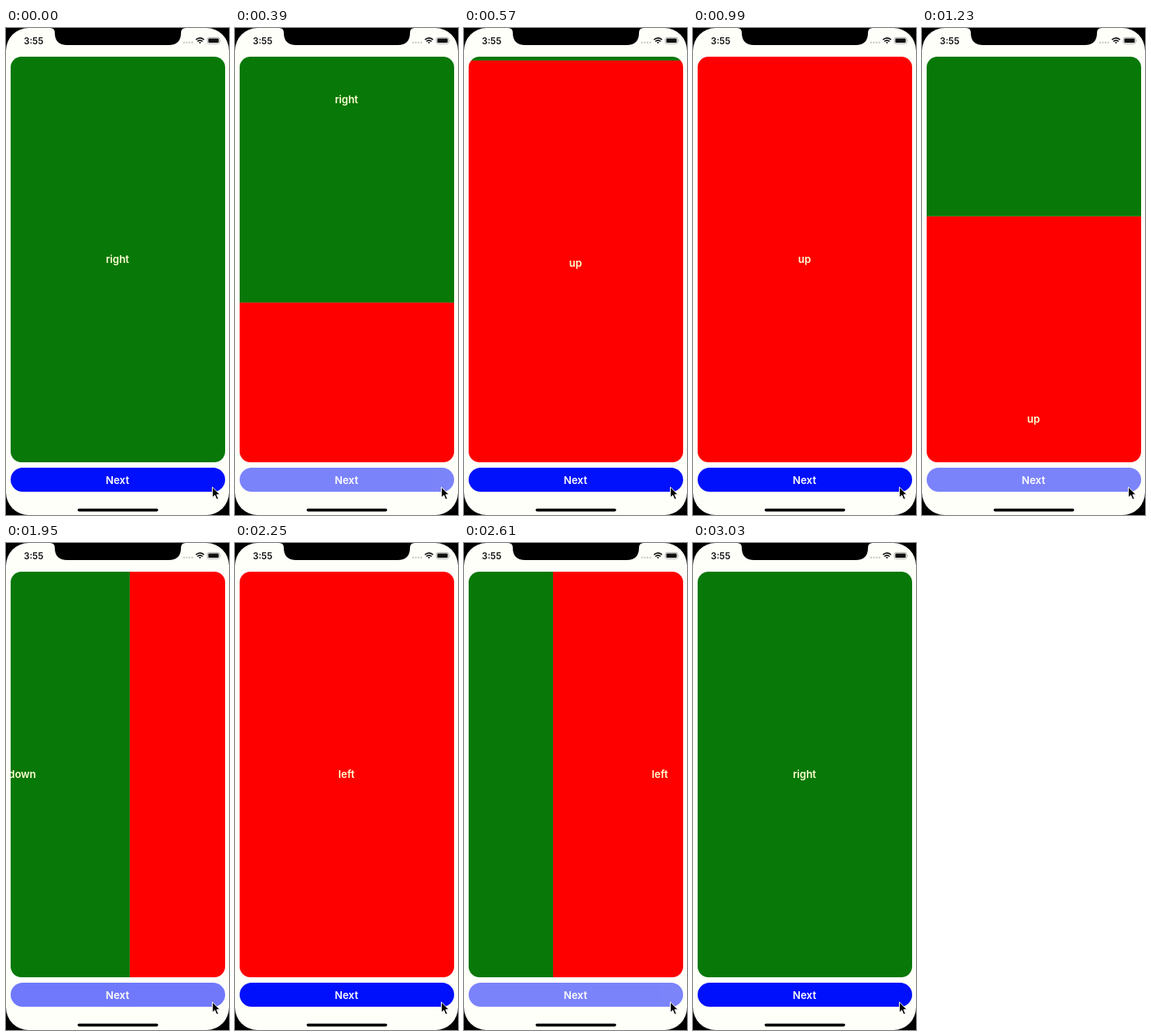
Write an HTML page that moves like this. It is 288 px wide and 628 px high and loops after 3.24 s.

```html
<!DOCTYPE html>
<html lang="en">
<head>
<meta charset="utf-8">
<title>Sliding cards</title>
<style>
  html, body { margin: 0; width: 100%; height: 100%; overflow: hidden; background: #000; }
  svg { display: block; width: 100%; height: 100%; }
  text { font-family: Inter, "Liberation Sans", sans-serif; font-weight: 600; }
  .label { font-size: 13.4px; text-anchor: middle; fill: #ffffd4; }
  .time { font-size: 11.6px; fill: #111; }
</style>
</head>
<body>
<svg viewBox="0 0 288 628">
  <defs>
    <clipPath id="card"><rect x="6" y="37" width="277" height="523" rx="14"/></clipPath>
  </defs>
  <rect width="288" height="628" fill="#000"/>
  <rect width="288" height="628" rx="29" fill="#fffffa"/>
  <path d="M57 0Q63 0 63 6Q63 22 79 22H210Q226 22 226 6Q226 0 232 0Z" fill="#000"/>

  <text class="time" x="23" y="20.5">3:55</text>
  <g fill="#ccccc0">
    <circle cx="230" cy="18.8" r="1.2"/><circle cx="233.5" cy="18.8" r="1.2"/>
    <circle cx="237" cy="18.8" r="1.2"/><circle cx="240.5" cy="18.8" r="1.2"/>
  </g>
  <g fill="none" stroke="#111" stroke-width="1.7">
    <path d="M245.3 15.2Q250.5 10.6 255.7 15.2M247.2 17.3Q250.5 14.4 253.8 17.3"/>
    <path d="M250.5 20.3L248.9 18.6Q250.5 17.3 252.1 18.6Z" fill="#111" stroke="none"/>
  </g>
  <rect x="260" y="12.3" width="16" height="8" rx="2.3" fill="none" stroke="#999" stroke-width=".8"/>
  <rect x="261.3" y="13.6" width="13.4" height="5.4" rx="1.2" fill="#111"/>
  <path d="M277 14.9q1.2 1.4 0 2.8z" fill="#999"/>

  <g clip-path="url(#card)">
    <g id="old"><rect x="6" y="37" width="277" height="523"/><text class="label" x="144" y="303.3"></text></g>
    <g id="new"><rect x="6" y="37" width="277" height="523"/><text class="label" x="144" y="303.3"></text></g>
  </g>

  <g id="button">
    <rect x="6" y="567" width="277" height="31" rx="15.5" fill="#0010fc"/>
    <text class="label" x="144" y="587.8" style="fill:#fff">Next</text>
  </g>
  <rect x="92.5" y="619.8" width="104" height="3.6" rx="1.8" fill="#000"/>
  <path d="M266.5 592V605.6L269.7 602.6L272 608L274.4 607L272.1 601.8H276.4Z" fill="#000" stroke="#fff" stroke-width="1"/>
</svg>
<script>
  const LOOP = 3240, STEP = 30, SLIDE = 350, PRESS = 60, DIM = 0.2;
  const WIDTH = 277, HEIGHT = 523;
  const colors = ["#087808", "#ff0000"];
  // Each card enters moving in the direction it names.
  const slides = [
    { at: 240, name: "up", dx: 0, dy: -1 },
    { at: 1080, name: "down", dx: 0, dy: 1 },
    { at: 1788, name: "left", dx: -1, dy: 0 },
    { at: 2460, name: "right", dx: 1, dy: 0 }
  ];
  const $ = id => document.getElementById(id);
  const clamp = x => Math.max(0, Math.min(1, x));
  const ease = x => x * x * (3 - 2 * x);

  function place(card, name, color, x, y) {
    card.setAttribute("transform", `translate(${x * WIDTH} ${y * HEIGHT})`);
    card.children[0].setAttribute("fill", color);
    card.children[1].textContent = name;
  }

  function draw(t) {
    let i = slides.length - 1;
    while (i > 0 && t < slides[i].at) i--;
    const s = slides[i];
    const before = slides[(i + 3) % 4].name;
    const p = ease(clamp((t - s.at) / SLIDE));
    place($("old"), before, colors[i % 2], s.dx * p, s.dy * p);
    place($("new"), s.name, colors[(i + 1) % 2], s.dx * (p - 1), s.dy * (p - 1));

    let opacity = t < s.at ? 1 : DIM + (1 - DIM) * p;
    const next = slides.find(n => t < n.at);
    if (next && t >= next.at - PRESS) {
      opacity = 1 - (1 - DIM) * clamp((t - next.at + PRESS) / PRESS);
    }
    $("button").setAttribute("opacity", opacity);
  }

  const start = performance.now();
  function tick() {
    const t = (performance.now() - start) % LOOP;
    draw(Math.floor(t / STEP) * STEP);
    requestAnimationFrame(tick);
  }
  draw(0);
  requestAnimationFrame(tick);
</script>
</body>
</html>
```
